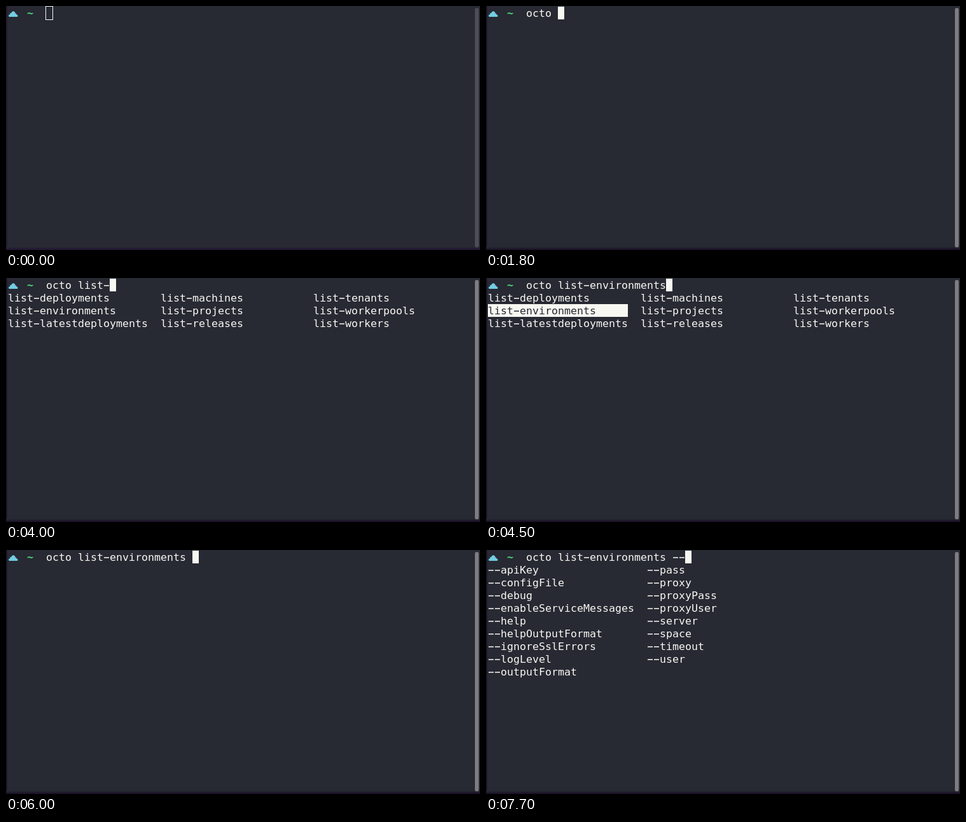
An HTML page with a canvas for the animation above (8 s loop, 745 by 383 pixels).

```html
<!DOCTYPE html>
<html lang="en">
<head>
<meta charset="utf-8">
<title>Shell completion</title>
<style>
  html, body { margin: 0; width: 100%; height: 100%; overflow: hidden; background: #272933; }
  canvas { display: block; width: 745px; height: 383px; }
</style>
</head>
<body>
<canvas id="stage"></canvas>
<script>
const W = 745, H = 383, LOOP = 8000;
const CELL = 10, LINE = 20, LEFT = 3, TOP = 1, INPUT_COL = 6;
const BG = '#272933', FG = '#f8f8f2', CYAN = '#73cde3', GREEN = '#4ce078';
const FONT = '16.6px "DejaVu Sans Mono", monospace';

const canvas = document.getElementById('stage');
const ctx = canvas.getContext('2d');
const ratio = window.devicePixelRatio || 1;
canvas.width = W * ratio;
canvas.height = H * ratio;
ctx.scale(ratio, ratio);

const commands = {
  step: 24,
  columns: [
    ['list-deployments', 'list-environments', 'list-latestdeployments'],
    ['list-machines', 'list-projects', 'list-releases'],
    ['list-tenants', 'list-workerpools', 'list-workers']
  ]
};
const options = {
  step: 25,
  columns: [
    ['--apiKey', '--configFile', '--debug', '--enableServiceMessages', '--help',
     '--helpOutputFormat', '--ignoreSslErrors', '--logLevel', '--outputFormat'],
    ['--pass', '--proxy', '--proxyPass', '--proxyUser', '--server', '--space',
     '--timeout', '--user']
  ]
};

// Each list holds [start time, value]; a value lasts until the next one.
const typed = [
  [0, ''], [1200, 'o'], [1500, 'oc'], [1700, 'oct'], [1800, 'octo '],
  [2100, 'octo l'], [2200, 'octo li'], [2300, 'octo list'], [3000, 'octo list-'],
  [4500, 'octo list-environments'], [6000, 'octo list-environments '],
  [6300, 'octo list-environments -'], [6500, 'octo list-environments --']
];
const cursorOn = [
  [0, true], [900, false], [1300, true], [3100, false], [3400, true], [3700, false],
  [4000, true], [4700, false], [5300, true], [7100, false], [7700, true]
];
const menus = [[0, null], [3400, commands], [6000, null], [6900, options]];
const picks = [[0, ''], [4500, 'list-environments'], [6000, '']];
const focusSteps = [[0, 0], [300, 1 / 3], [400, 2 / 3], [500, 1]];

function at(track, t) {
  let value = track[0][1];
  for (const [start, v] of track) if (t >= start) value = v;
  return value;
}

const cellX = col => LEFT + col * CELL;
const rowY = row => TOP + row * LINE;

function box(x, y, w, h, color) {
  ctx.fillStyle = color;
  ctx.fillRect(x, y, w, h);
}

function write(text, col, row, color, weight = '') {
  ctx.font = weight + ' ' + FONT;
  ctx.fillStyle = color;
  [...text].forEach((ch, i) => {
    const x = cellX(col + i), y = rowY(row);
    if (ch === '-') ctx.fillRect(x + 1, y + 10.2, 8, 1.5);
    else ctx.fillText(ch, x, y + 16);
  });
}

function mix(a, b, k) {
  return `rgb(${a.map((v, i) => Math.round(v + (b[i] - v) * k))})`;
}

function drawWindow(focus) {
  box(0, 0, W, H, BG);
  const edge = mix([33, 18, 50], [24, 14, 36], focus);
  box(0, 0, 1.5, H, edge);
  const fade = ctx.createLinearGradient(0, H - 5, 0, H);
  fade.addColorStop(0, BG);
  fade.addColorStop(1, edge);
  box(0, H - 5, W, 5, fade);
  ctx.fillStyle = mix([77, 78, 85], [125, 125, 128], focus);
  ctx.beginPath();
  ctx.roundRect(737, 3, 6, 376, 3);
  ctx.fill();
}

function drawCloud() {
  ctx.fillStyle = CYAN;
  ctx.beginPath();
  ctx.moveTo(5.5, 17);
  ctx.bezierCurveTo(3.4, 16.6, 3.7, 13.5, 6.2, 13.3);
  ctx.bezierCurveTo(6, 11, 7.6, 10.7, 8.3, 11);
  ctx.bezierCurveTo(9.3, 7.1, 14.6, 7.5, 14.7, 11.8);
  ctx.bezierCurveTo(16.4, 11.5, 16.8, 12.7, 16.6, 13.7);
  ctx.bezierCurveTo(19.2, 14, 19.2, 16.7, 17.3, 17);
  ctx.closePath();
  ctx.fill();
}

function drawCursor(col, focused) {
  const x = cellX(col);
  if (focused) {
    box(x, TOP, CELL, LINE, FG);
  } else {
    ctx.strokeStyle = FG;
    ctx.lineWidth = 1;
    ctx.strokeRect(x - 0.5, 0.5, CELL + 1, LINE + 1);
  }
}

function drawMenu(menu, pick) {
  menu.columns.forEach((items, c) => items.forEach((item, i) => {
    const col = c * menu.step, row = i + 1, chosen = item === pick;
    if (chosen) box(cellX(col), rowY(row), (menu.step - 2) * CELL, LINE, FG);
    write(item, col, row, chosen ? BG : FG);
  }));
}

function draw(t) {
  const focus = at(focusSteps, t);
  const text = at(typed, t);
  const menu = at(menus, t);
  drawWindow(focus);
  drawCloud();
  write('~', 3, 0, GREEN, 'bold');
  write(text, INPUT_COL, 0, FG);
  if (menu) drawMenu(menu, at(picks, t));
  if (at(cursorOn, t)) drawCursor(INPUT_COL + text.length, focus > 0);
}

const begin = performance.now();
function tick() {
  draw((performance.now() - begin) % LOOP);
  requestAnimationFrame(tick);
}
tick();
</script>
</body>
</html>
```
